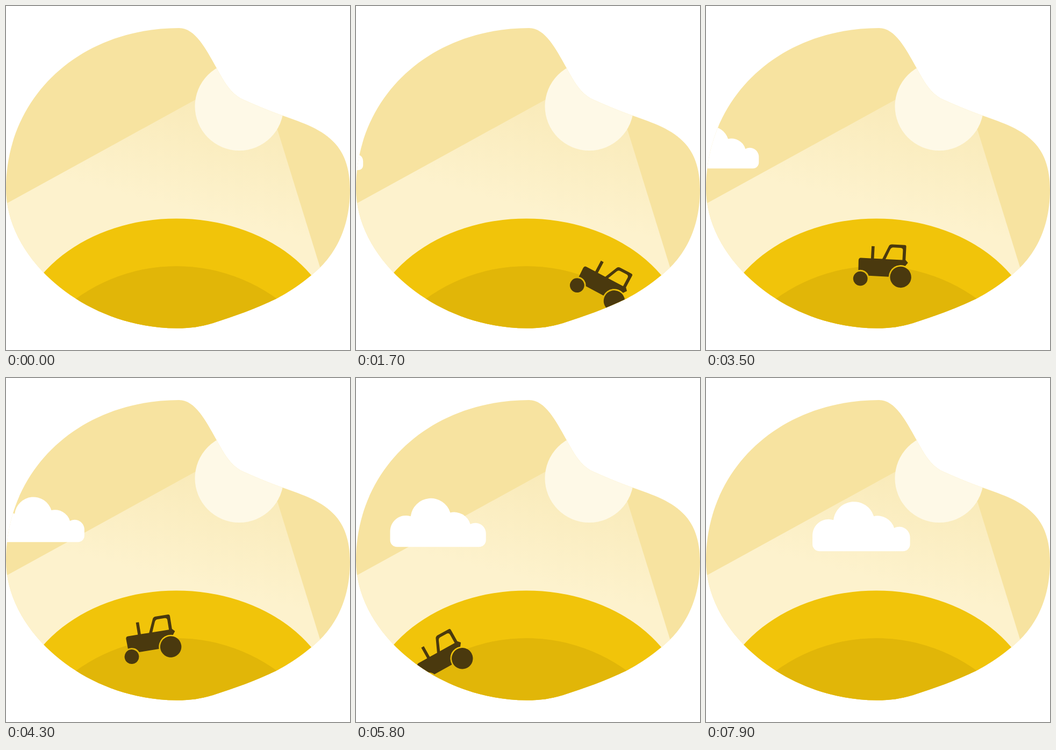
An HTML page that plays this animation: 640 by 640 pixels, repeating every 8000 ms.

```html
<!DOCTYPE html>
<html lang="en">
<head>
<meta charset="utf-8">
<title>Tractor on the hill</title>
<style>
  html, body { margin: 0; width: 100%; height: 100%; overflow: hidden; background: #fff; }
  svg { display: block; width: 100%; height: 100%; }
</style>
</head>
<body>
<svg viewBox="0 0 640 640">
  <defs>
    <clipPath id="blob">
      <path d="M322 41C352 41 372 80 391 114C404 138 418 164 441 174C465 185 490 195 515 204
               C580 227 640 246 640 342C640 425 602 475 568 501C545 520 525 533 502 545
               C465 563 425 577 385 590C360 597 345 599.5 318 599.5C148 599.5 0 472 0 340
               C0 168 138 41 322 41Z"/>
    </clipPath>
    <linearGradient id="light" gradientUnits="userSpaceOnUse" x1="430" y1="180" x2="378" y2="390">
      <stop offset="0" stop-color="#f9eab8"/>
      <stop offset="1" stop-color="#fdf2cd"/>
    </linearGradient>
  </defs>
  <g clip-path="url(#blob)">
    <rect width="640" height="640" fill="#f7e3a0"/>
    <path d="M-10 373.6L353 174L434 186L505 230L630 634H-10Z" fill="url(#light)"/>
    <circle cx="434" cy="186.5" r="82.5" fill="#fef9e7"/>
    <path id="cloud" fill="#fff"
      d="M0-25V-13A13 13 0 0 1-13 0H-168.5A13 13 0 0 1-181.5-13V-29A30 30 0 0 1-142.5-58
         A38.5 38.5 0 0 1-67.5-65A32 32 0 0 1-29.5-43A20 20 0 0 1 0-25Z"/>
    <ellipse cx="317" cy="628.5" rx="300" ry="233" fill="#f1c40a"/>
    <circle cx="317" cy="802" r="318" fill="#e1b608"/>
    <!-- The tractor's origin is the centre of its rear wheel. -->
    <g id="tractor" fill="#4a390e">
      <path fill-rule="evenodd"
        d="M-79.9-27Q-79.9-32-75.5-32H-57V-54.7H-51.4V-32H-35.8L-25-56.5Q-23.3-60-19-60H4.5
           Q7.4-60 7.4-57V-32.5L12.2-27.4L7.5-21.1A22.4 22.4 0 0 0-22.4 .5H-59.6
           A16.3 16.3 0 0 0-79.3-9Z
           M-29.8-32L-22-50.5Q-20.3-54.4-16.5-54.4H-3Q1.6-54.4 1.6-50V-32Z"/>
      <circle r="19.7"/>
      <circle cx="-74.7" cy="6.7" r="13.4"/>
    </g>
  </g>
</svg>
<script>
  const LOOP = 8;          // seconds
  const LEVEL_TIME = 3.7;  // when the tractor stands level

  const tractor = document.getElementById('tractor');
  const cloud = document.getElementById('cloud');
  const start = performance.now();

  // Over the hill along a parabola, tipping from uphill to downhill
  function placeTractor(time) {
    const t = time - LEVEL_TIME;
    const x = 348.5 - 68.8 * t - 1.4 * t * t;
    const y = 500 + 0.0017 * (x - 311) ** 2;
    const tilt = -41.5 * Math.sin(0.37 * t);
    tractor.setAttribute('transform', `translate(${x} ${y}) rotate(${tilt})`);
  }

  // Drifts right with a slow bob while it grows to full size
  function placeCloud(time) {
    const shrink = 0.61 * Math.max(0, 1 - time / 7) ** 2;
    const right = 65.7 * time - 139.5 + 335 * shrink * shrink;
    const bottom = 312 - 10.2 * Math.cos((time - 3) * Math.PI / 4.9);
    cloud.setAttribute('transform', `translate(${right} ${bottom}) scale(${1 - shrink})`);
  }

  function draw(now) {
    const time = Math.max(0, now - start) / 1000 % LOOP;
    placeTractor(time);
    placeCloud(time);
    requestAnimationFrame(draw);
  }
  draw(start);
</script>
</body>
</html>
```
